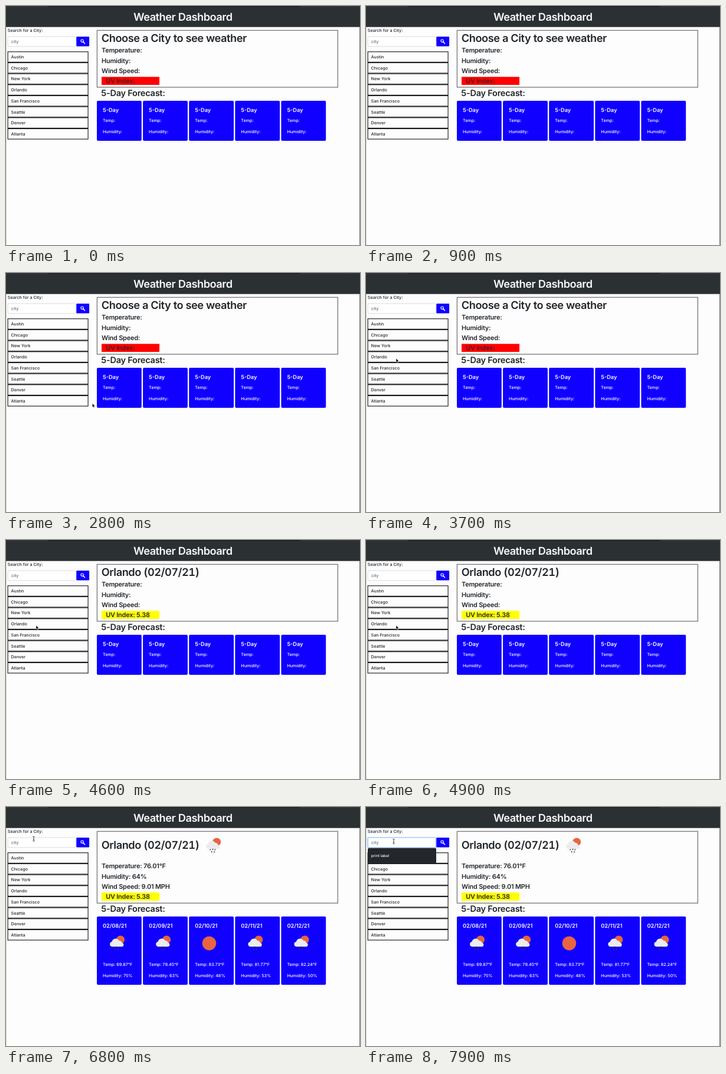
Recreate the animation shown at these times as an HTML page. Size 600 by 406 pixels, loop 8000 ms.

```html
<!DOCTYPE html>
<html lang="en">
<head>
<meta charset="utf-8">
<title>Weather Dashboard</title>
<style>
  html, body { margin: 0; width: 100%; height: 100%; overflow: hidden; background: #fdfdfd; }
  svg { display: block; width: 600px; height: 406px; }
  text {
    font: 500 7.2px Inter, "Open Sans", sans-serif;
    text-rendering: geometricPrecision;
    fill: #212529;
    white-space: pre;
  }
  .h1, .h2, .h4, .h5 { font-weight: 600; }
  .h1 { font-size: 18.2px; letter-spacing: -.025em; font-variant-numeric: tabular-nums; }
  .h2 { font-size: 14.55px; letter-spacing: -.018em; }
  .h4 { font-size: 10.9px; letter-spacing: -.018em; }
  .h5 { font-size: 9.2px; }
  .banner { fill: #f8f9fa; text-anchor: middle; }
  .hint { fill: #666d74; }
  .tip { font-size: 6.4px; fill: #fff; }
  .row { fill: none; stroke: #111; stroke-width: 1.1; }
  .panel { fill: none; stroke: #777; stroke-width: 1.3; }
  .blue { fill: #1000ff; }
  .card text { fill: #fff; }
  .sun { fill: #e9643f; }
  .cloud { fill: #ececee; }
  .drops { stroke: #3c3c3f; stroke-width: 1.5; stroke-linecap: round; }
</style>
</head>
<body>
<svg viewBox="0 0 600 406">
  <defs>
    <g id="rain">
      <circle class="sun" cx="5.8" cy="-6.2" r="7"/>
      <path class="cloud" d="M-8.4 5.6a4.2 4.2 0 0 1-.4-8.3a6.6 6.6 0 0 1 12.3-1.8a4.6 4.6 0 0 1 4.8 3.6a3.3 3.3 0 0 1 .1 6.5z"/>
      <path class="drops" fill="none" d="M-4.8 6.4l-.5 1M-.6 5.8l-.5 1M3.2 6.4l-.5 1M-2.4 10l-.5 1M2 10.2l-.5 1"/>
    </g>
    <circle id="clear" class="sun" r="11.8"/>
  </defs>

  <rect width="600" height="406" fill="#fdfdfd"/>
  <path d="M.3 36V406" stroke="#aaa" stroke-width=".6"/>
  <path d="M599.5 36V406" stroke="#777"/>
  <rect width="600" height="35.7" fill="#2b3033"/>
  <rect width="600" height="1.6" fill="#35363a"/>
  <rect x="70" y="-3" width="429" height="4.4" rx="2" fill="#1f2023"/>
  <circle cx="573" cy="-.4" r="1.4" fill="#a3262b"/>
  <text class="h1 banner" x="299.8" y="25.2">Weather Dashboard</text>

  <text x="2.8" y="44.4">Search for a City:</text>
  <rect id="glow" x="2" y="51" width="117.5" height="19" rx="2.6" fill="#bcd9fb"/>
  <rect id="field" x="3.2" y="52" width="115" height="16.8" rx="1.8" fill="#fff"/>
  <text class="hint" x="8.8" y="63.2">city</text>
  <path id="caret" d="M9 56.2V65" stroke="#222" stroke-width=".7"/>
  <rect class="blue" x="119.3" y="52" width="21.8" height="16.6" rx="1"/>
  <path d="M130.7 60.9L133.6 63.8" stroke="#fff" stroke-width="1.5" stroke-linecap="round"/>
  <circle cx="129.1" cy="59.2" r="2.2" fill="none" stroke="#fff" stroke-width="1.1"/>
  <g id="cities"></g>

  <rect id="panel" class="panel" x="154.4" y="41.4" width="408"/>
  <text id="place" class="h1" x="161.8"></text>
  <use id="icon" href="#rain" x="351.3" y="65.6"/>
  <g id="lower">
    <text class="h4" x="162" y="79.4"></text>
    <text class="h4" x="162" y="96.7"></text>
    <text class="h4" x="162" y="114"></text>
    <rect id="uvBox" x="162" y="120.4" width="98" height="13.6"/>
    <text id="uv" class="h4" x="169.2" y="131.2"></text>
    <text class="h2" x="161.3" y="153.2">5-Day Forecast:</text>
  </g>
  <g id="empty"></g>
  <g id="full"></g>

  <g id="menu">
    <rect x="3" y="69.8" width="116" height="25.8" rx="2" fill="#23262a"/>
    <text class="tip" x="8.8" y="85.2">print label</text>
  </g>
  <path id="arrow" d="M0 0V6.7L1.5 5.2L2.5 7.6L3.6 7.1L2.6 4.9H4.8Z" fill="#000" stroke="#fff" stroke-width=".5"/>
  <path id="beam" d="M-1.8-4Q0-4 0-3Q0-4 1.8-4M0-3V3M-1.8 4Q0 4 0 3Q0 4 1.8 4M-1 .9H1" fill="none" stroke="#222" stroke-width=".8"/>
</svg>
<script>
const LOOP = 8000, STEP = 100;
const TITLE_AT = 4600, DATA_AT = 5300, FOCUS_AT = 7200, CARET_OFF = 7700;
const $ = id => document.getElementById(id);
const show = (id, on) => { $(id).style.display = on ? '' : 'none'; };
const set = (id, attrs) => { for (const k in attrs) $(id).setAttribute(k, attrs[k]); };

const cities = ['Austin', 'Chicago', 'New York', 'Orlando', 'San Francisco', 'Seattle', 'Denver', 'Atlanta'];
const days = [
  ['02/08/21', 'rain', '69.87', 75], ['02/09/21', 'rain', '79.45', 63],
  ['02/10/21', 'clear', '83.73', 48], ['02/11/21', 'rain', '81.77', 53],
  ['02/12/21', 'rain', '82.24', 50]
];
const labels = ['Temperature:', 'Humidity:', 'Wind Speed:'];
const values = [' 76.01°F', ' 64%', ' 9.01 MPH'];

// Each row keeps its own border, so neighbours form a double line
const PITCH = 18.68;
$('cities').innerHTML = cities.map((name, i) => {
  const y = 77.2 + PITCH * i;
  return `<rect class="row" x="3.1" y="${y + .55}" width="136" height="${PITCH - 1.1}"/>
    <text x="8.5" y="${y + 11.9}">${name}</text>`;
}).join('');

function card(i, top, height, title, temp, humidity, icon) {
  const end = height - 68;
  return `<g class="card" transform="translate(${154 + 78.1 * i} ${top})">
    <rect class="blue" width="75.8" height="${height}" rx="2"/>
    <text class="h5" x="10" y="19">${title}</text>
    ${icon ? `<use href="#${icon}" x="34.2" y="45.6"/>` : ''}
    <text x="10" y="${end + 35.7}">Temp:${temp}</text>
    <text x="10" y="${end + 54.6}">Humidity:${humidity}</text></g>`;
}
$('empty').innerHTML = days.map((_, i) => card(i, 161, 68, '5-Day', '', '')).join('');
$('full').innerHTML = days.map(([date, icon, temp, hum], i) =>
  card(i, 186, 116, date, ` ${temp}°F`, ` ${hum}%`, icon)).join('');

// Pointer way points: time, x, y
const path = [
  [1400, 259.5, 401], [2000, 275.5, 377], [2200, 278, 333.5], [3100, 80.5, 165.5],
  [3400, 53, 148.2], [3500, 53, 148.2], [3700, 51, 145], [6200, 51, 145],
  [6700, 47.5, 59], [6800, 47, 54], [7100, 47, 58.5], [LOOP, 47, 58.5]
];
function pointer(t) {
  const i = path.findIndex(p => p[0] > t);
  const [t0, x0, y0] = path[i - 1], [t1, x1, y1] = path[i];
  const k = (t - t0) / (t1 - t0);
  return [x0 + (x1 - x0) * k, y0 + (y1 - y0) * k];
}

const metrics = document.querySelectorAll('#lower .h4:not(#uv)');

function draw(t) {
  const named = t >= TITLE_AT, loaded = t >= DATA_AT, focus = t >= FOCUS_AT;
  $('place').textContent = named ? 'Orlando (02/07/21)' : 'Choose a City to see weather';
  set('place', { y: loaded ? 70.7 : 60.6 });
  set('panel', { height: loaded ? 121.9 : 96.6 });
  set('lower', { transform: `translate(0 ${loaded ? 25 : 0})` });
  metrics.forEach((m, i) => { m.textContent = labels[i] + (loaded ? values[i] : ''); });
  $('uv').textContent = 'UV Index:' + (named ? ' 5.38' : '');
  set('uv', { opacity: named ? 1 : .82 });
  set('uvBox', { fill: named ? '#ff0' : '#f00' });
  show('icon', loaded);
  show('empty', !loaded);
  show('full', loaded);

  show('glow', focus);
  show('menu', focus);
  show('caret', focus && t < CARET_OFF);
  set('field', { stroke: focus ? '#80b8f8' : '#ced4da', 'stroke-width': .8 });

  const inside = t >= 6600, visible = t >= path[0][0];
  show('arrow', visible && !inside);
  show('beam', visible && inside);
  if (visible) set(inside ? 'beam' : 'arrow', { transform: `translate(${pointer(t)})` });
}

const start = performance.now();
let last = -1;
function tick() {
  const t = Math.floor((performance.now() - start) % LOOP / STEP) * STEP;
  if (t !== last) draw(last = t);
  requestAnimationFrame(tick);
}
tick();
</script>
</body>
</html>
```
